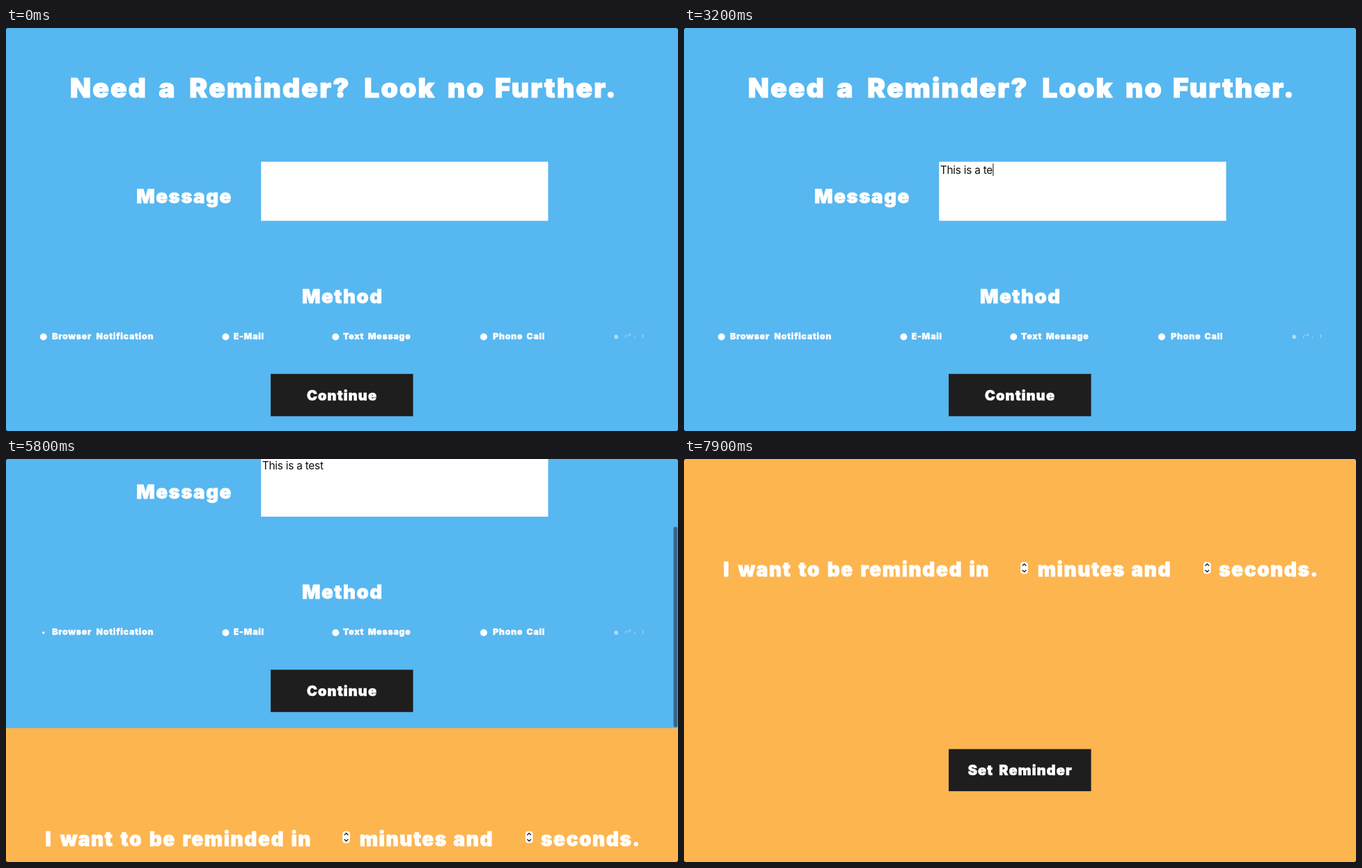
Animation of 965 by 580 pixels, one loop 8 s. Source, as an HTML page:

```html
<!DOCTYPE html>
<html lang="en">
<head>
<meta charset="utf-8">
<title>Reminder form</title>
<style>
  html, body { margin: 0; width: 100%; height: 100%; overflow: hidden; background: #fdb550; }
  svg { display: block; width: 965px; height: 580px; }
  .black {
    font-family: Inter, Roboto, "Liberation Sans", sans-serif;
    font-weight: 900;
    font-optical-sizing: none;
    letter-spacing: .055em;
    text-anchor: middle;
    fill: #fff;
    stroke: #fff;
    stroke-width: .03em;
  }
  .input {
    font: 15.5px Inter, "Liberation Sans", sans-serif;
    font-optical-sizing: none;
    letter-spacing: -.018em;
    fill: #111;
    white-space: pre;
  }
</style>
</head>
<body>
<svg viewBox="0 0 965 580" xmlns="http://www.w3.org/2000/svg">
  <g id="page">
    <rect width="965" height="582" fill="#57b7f0"/>
    <rect y="582" width="965" height="582" fill="#fdb550"/>
    <rect x="366.3" y="192.5" width="412.2" height="85" fill="#fff"/>
    <text id="typed" class="input" x="367.7" y="209.7"></text>
    <rect id="caret" y="195" width="1" height="18" fill="#111"/>
    <g fill="#fff">
      <circle id="radio" cx="53.8" cy="444.5" r="5"/>
      <circle cx="315.5" cy="444.5" r="5"/>
      <circle cx="473.3" cy="444.5" r="5"/>
      <circle cx="686" cy="444.5" r="5"/>
    </g>
    <g opacity=".5">
      <circle cx="876.2" cy="444.5" r="2.9" fill="#fff"/>
      <path d="M889 446l2-5M893 444l2-4M896 443l1-3M902 445h2M914.5 441v5" stroke="#fff" fill="none"/>
    </g>
    <g fill="#1e1e1e">
      <rect x="380.1" y="497.8" width="204.5" height="60.9"/>
      <rect x="380.1" y="999.5" width="204.5" height="60.6"/>
    </g>
  </g>
  <rect id="thumb" x="958.6" width="5.6" height="288.5" rx="2.8" fill="#000" opacity=".43"/>
  <path d="M0 0h2l-2 2zM965 0v2l-2-2zM0 580v-3q0 3 3 3zM965 580h-3q3 0 3-3z" fill="#222"/>
</svg>
<script>
const LOOP = 8000, FRAME = 100, PAGE = 582;
const MESSAGE = 'This is a test';
const FOCUS = 900, PICK = 4100;
const SCROLL_FROM = 5468.7, SCROLL_TIME = 844, SCROLL_END = 6200;
const $ = id => document.getElementById(id);
const page = $('page');

function add(tag, attrs, text = '') {
  const el = document.createElementNS('http://www.w3.org/2000/svg', tag);
  for (const k in attrs) el.setAttribute(k, attrs[k]);
  el.textContent = text;
  return page.appendChild(el);
}

// words: alternating text and centre x; half a letter gap recentres each word
function line(size, y, ...words) {
  for (let i = 0; i < words.length; i += 2) {
    add('text', { class: 'black', x: words[i + 1] + size * .0275, y, 'font-size': size }, words[i]);
  }
}

function spinner(x, y) {
  add('rect', { x: x - 5.3, y: y - 8.5, width: 10.6, height: 17, rx: 4, fill: '#fff' });
  add('path', {
    d: `M${x - 2.8} ${y - 3}l2.8-2.8 2.8 2.8M${x - 2.8} ${y + 3}l2.8 2.8 2.8-2.8`,
    fill: 'none', stroke: '#222', 'stroke-width': 1.4
  });
}

line(39, 100.2, 'Need', 146.5, 'a', 231, 'Reminder?', 378, 'Look', 564.8, 'no', 660, 'Further.', 788.8);
line(27.7, 251.7, 'Message', 255.3);
line(27.7, 395.6, 'Method', 482.6);
line(12.4, 447.9, 'Browser', 94.3, 'Notification', 170.5, 'E-Mail', 348.5,
  'Text', 498.7, 'Message', 550.3, 'Phone', 720.3, 'Call', 760.5);
line(20, 535.8, 'Continue', 482);
line(28, PAGE + 169.2, 'I', 60.5, 'want', 115.3, 'to', 179.5, 'be', 224, 'reminded', 326, 'in', 423.5,
  'minutes', 570, 'and', 670.5, 'seconds.', 839);
line(20, PAGE + 455.3, 'Set', 425.5, 'Reminder', 504.5);
spinner(488.6, PAGE + 156.7);
spinner(751.2, PAGE + 156.7);

const keyTimes = [...MESSAGE].map((c, i) => i < 4 ? 1500 + i * 130 : 1950 + (i - 3) * 150);
const clamp = v => Math.max(0, Math.min(1, v));

function scrollAt(t) {
  if (t < 5500) return 0;
  if (t >= SCROLL_END) return PAGE;
  return PAGE * (.5 - Math.cos(Math.PI * (t - SCROLL_FROM) / SCROLL_TIME) / 2);
}

function draw(t) {
  const count = keyTimes.filter(k => k <= t).length;
  const typed = $('typed');
  const text = MESSAGE.slice(0, count);
  if (typed.textContent !== text) typed.textContent = text;

  const lastKey = count ? keyTimes[count - 1] : FOCUS;
  const lit = t >= FOCUS && t < PICK && (t - lastKey) % 1000 < 500;
  const end = count ? typed.getComputedTextLength() : 0;
  $('caret').setAttribute('x', 368 + end);
  $('caret').setAttribute('opacity', lit ? 1 : 0);

  $('radio').setAttribute('r', 5 - 3.3 * clamp((t - PICK) / 300));

  // half-pixel scroll positions
  const y = Math.round(scrollAt(t) * 2) / 2;
  page.setAttribute('transform', `translate(0 ${-y})`);
  $('thumb').setAttribute('y', y / 2 + .3);
  $('thumb').setAttribute('visibility', y > 0 && t < SCROLL_END ? 'visible' : 'hidden');
}

const start = performance.now();
function tick() {
  const t = (performance.now() - start) % LOOP;
  draw(Math.floor(t / FRAME) * FRAME);
  requestAnimationFrame(tick);
}
draw(0);
requestAnimationFrame(tick);
</script>
</body>
</html>
```
